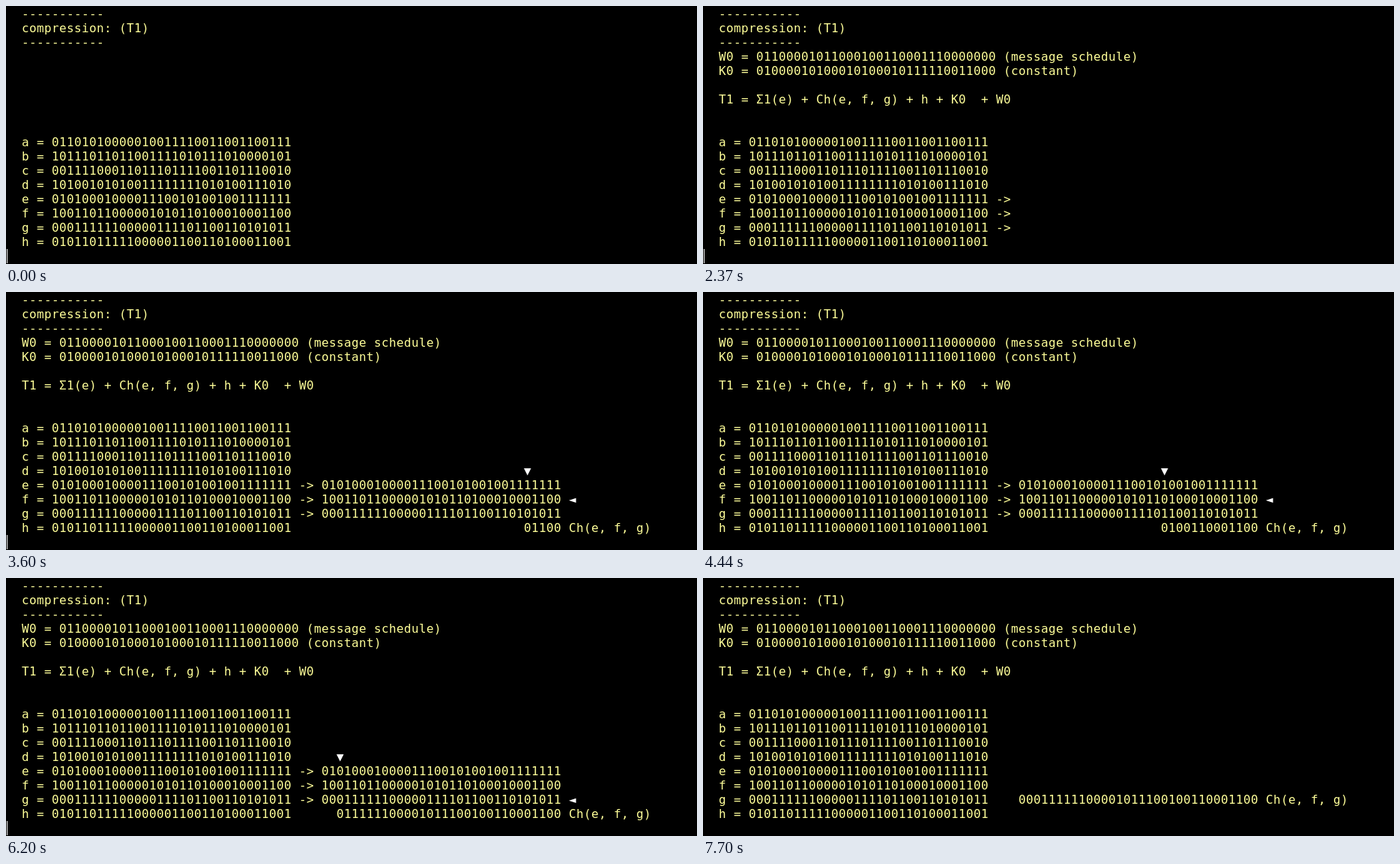
Animation, 922 px wide and 344 px high, one loop 8000 ms. Source, as an HTML page:

```html
<!DOCTYPE html>
<html lang="en">
<head>
<meta charset="utf-8">
<title>Compression step</title>
<style>
  html, body { margin: 0; width: 100%; height: 100%; overflow: hidden; background: #000; }
  svg { display: block; }
  text { font: 16px "DejaVu Sans Mono", monospace; fill: #ffff99; white-space: pre; }
  .mark { fill: #fff; }
</style>
</head>
<body>
<svg id="stage" width="922" height="344" viewBox="0 0 922 344"></svg>
<script>
const NS = "http://www.w3.org/2000/svg";
const stage = document.getElementById("stage");
const LOOP = 8000, CELL = 10, LINE = 19, ORIGIN = 1, ASCENT = 15;
const BITS = 32, COPY_COL = 42, LABEL_COL = 75;
const ROW = { d: 12, e: 13, f: 14, g: 15, h: 16 };

const binary = n => (n >>> 0).toString(2).padStart(BITS, "0");
const regs = {
  a: 0x6a09e667, b: 0xbb67ae85, c: 0x3c6ef372, d: 0xa54ff53a,
  e: 0x510e527f, f: 0x9b05688c, g: 0x1f83d9ab, h: 0x5be0cd19
};
const choice = binary((regs.e & regs.f) ^ (~regs.e & regs.g));
const eBits = binary(regs.e);

// Bursts of revealed bits: start time and count, one bit every 100 ms.
const bursts = [[3170, 3], [3500, 7], [4240, 9], [5170, 9], [6100, 4]];

function add(name, attrs) {
  const node = document.createElementNS(NS, name);
  for (const key in attrs) node.setAttribute(key, attrs[key]);
  return stage.appendChild(node);
}

// Writes a string on the terminal grid, one cell per character.
function write(node, row, col, str) {
  node.setAttribute("x", Array.from(str, (_, i) => ORIGIN + (col + i) * CELL).join(" "));
  node.setAttribute("y", ORIGIN + row * LINE + ASCENT);
  if (node.textContent !== str) node.textContent = str;
}

const timed = [];
function line(row, col, str, from = 0, to = LOOP) {
  const node = add("text", {});
  write(node, row, col, str);
  timed.push({ node, from, to });
}

const show = (node, on) => node.setAttribute("visibility", on ? "visible" : "hidden");

const rule = "-".repeat(11);
line(0, 2, rule);
line(1, 2, "compression: (T1)");
line(2, 2, rule);
line(3, 2, "W0 = " + binary(0x61626380) + " (message schedule)", 400);
line(4, 2, "K0 = " + binary(0x428a2f98) + " (constant)", 770);
line(6, 2, "T1 =", 1170);
line(6, 7, "Σ1(e) + Ch(e, f, g) + h + K0  + W0", 1770);
Object.keys(regs).forEach((key, i) => line(9 + i, 2, key + " = " + binary(regs[key])));
for (const key of "efg") {
  line(ROW[key], 39, "->", 2370, 7300);
  line(ROW[key], COPY_COL, binary(regs[key]), 2770, 7300);
}

const result = add("text", {});
const label = add("text", {});
const down = add("text", { class: "mark" });
const left = add("text", { class: "mark" });
const cursor = add("rect", { x: 1, y: 324, width: 1, height: LINE, fill: "#fff" });

function bitsAt(t) {
  return bursts.reduce((sum, [start, count]) =>
    sum + Math.max(0, Math.min(count, Math.floor((t - start) / 100) + 1)), 0);
}

function draw(t) {
  for (const { node, from, to } of timed) show(node, t >= from && t < to);

  const count = bitsAt(t);
  const index = BITS - count;
  const col = COPY_COL + index;
  const row = t < 7700 ? ROW.h : ROW.g;
  write(result, row, col, choice.slice(index));
  write(label, row, LABEL_COL, "Ch(e, f, g)");
  show(label, count > 0);

  const scanning = count > 0 && t < 6900;
  write(down, ROW.d, col, "▼");
  write(left, eBits[index] === "1" ? ROW.f : ROW.g, LABEL_COL, "◄");
  show(down, scanning);
  show(left, scanning);

  show(cursor, Math.floor((t + 230) / 600) % 2 === 0);
}

const begin = performance.now();
function tick() {
  draw((performance.now() - begin) % LOOP);
  requestAnimationFrame(tick);
}
draw(0);
requestAnimationFrame(tick);
</script>
</body>
</html>
```
